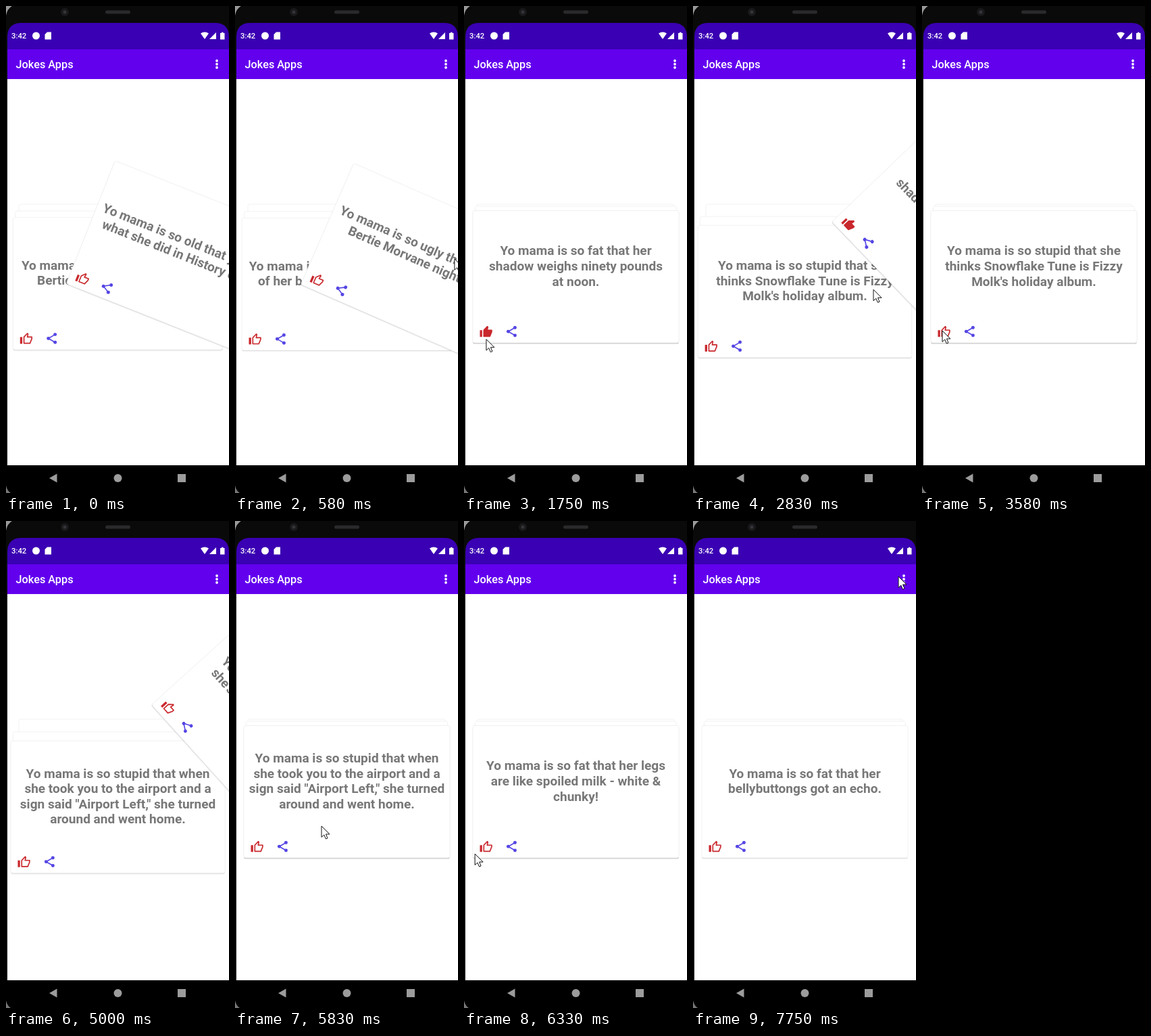
Animation, 330 px wide and 720 px high, one loop 8 s. Source, as an HTML page:

```html
<!DOCTYPE html>
<html lang="en">
<head>
<meta charset="utf-8">
<title>Joke cards</title>
<style>
html, body { margin: 0; width: 100%; height: 100%; overflow: hidden; background: #000; }
svg { display: block; width: 100vw; height: 100vh; }
text { font-family: Roboto, "Open Sans", sans-serif; }
.joke { font-size: 19.05px; font-weight: 700; fill: #777; text-anchor: middle; }
.face { fill: #fff; stroke: #efefef; stroke-width: .8; }
</style>
</head>
<body>
<svg viewBox="0 0 330 720">
  <defs>
    <clipPath id="page"><rect x="2" y="108" width="328" height="571"/></clipPath>
    <g id="share" fill="#5546e4" stroke="#5546e4" stroke-width="2">
      <path d="M18 5 6 12 18 19" fill="none"/>
      <g stroke="none"><circle cx="18" cy="5" r="3"/><circle cx="6" cy="12" r="3"/><circle cx="18" cy="19" r="3"/></g>
    </g>
    <g id="thumb" stroke="#c9282d" stroke-width="2" stroke-linejoin="round">
      <path d="M1 9H5V21H1Z" fill="#c9282d" stroke="none"/>
      <path d="M8 9 14.2 2.5 15.2 3.6 14 9H22V12L18.7 20H8Z"/>
    </g>
  </defs>
  <rect width="330" height="720" fill="#0a0a0a"/>
  <path d="M0 0H9Q2 4 0 14Z" fill="#999"/>
  <path d="M0 709Q2 717 7 720H0Z" fill="#777"/>
  <circle cx="87" cy="9" r="6" fill="#19191b"/>
  <circle cx="87" cy="9" r="2.5" fill="#343438"/>
  <rect x="147" y="6.500" width="37" height="5" rx="2.500" fill="#2a2a2c"/>
  <rect x="2" y="60" width="328" height="619" fill="#fff"/>
  <path d="M2 64V46Q2 25 23 25H309Q330 25 330 46V64Z" fill="#3a00b3"/>
  <rect x="2" y="64" width="328" height="44" fill="#6200ee"/>
  <g fill="#fff">
    <text x="8" y="48" font-size="11.300" font-weight="500">3:42</text>
    <circle cx="44.500" cy="44" r="5.500"/>
    <path d="M61 38.500H67V49.500H57.500V42Z"/>
    <path d="M288 40.500Q294 36.500 300 40.500L294 49Z"/>
    <path d="M311 39V49H301Z"/>
    <path d="M317 40H319V38.700H321.500V40H323.500V49.500H317Z"/>
    <text x="14.500" y="92.300" font-size="16.300" font-weight="500">Jokes Apps</text>
    <circle cx="312" cy="81" r="1.900"/><circle cx="312" cy="86" r="1.900"/><circle cx="312" cy="91" r="1.900"/>
  </g>
  <g clip-path="url(#page)">
    <rect class="face" x="19" y="293" width="292" height="195" rx="3"/>
    <rect class="face" id="third" height="195" rx="3"/>
    <g id="cards"></g>
  </g>
  <rect y="679" width="330" height="41" fill="#000"/>
  <path d="M0 709Q2 717 7 720H0Z" fill="#777"/>
  <g fill="#9c9c9c">
    <path d="M75.500 691.500V704.500L64 698Z"/>
    <circle cx="165.500" cy="698" r="6"/>
    <rect x="254" y="692" width="12" height="12"/>
  </g>
  <path id="cursor" d="M0 0V16.500L3.800 13 6.400 19 9 17.900 6.500 12H12Z" fill="#fff" stroke="#111" stroke-linejoin="round"/>
</svg>
<script>
const LOOP = 8000, CX = 165.5, CY = 400, LINE = 22.6;
const DRAG = 250, FLING = 180, REACH = 115, EXIT = 330, TILT = .213;

// grab: when the swipe starts; hold: where the pointer grabs; lift: slope of the swipe
const cards = [
  { text: "Yo mama is so old that you asked|what she did in History classes.",
    grab: -220, hold: [250, 420], lift: -.24 },
  { text: "Yo mama is so ugly that she gave|Bertie Morvane nightmares.",
    grab: 340, hold: [214, 391], lift: -.155 },
  { text: "Yo mama is so fat that the bottom|of her belly blocks out the sun.", grab: 340 },
  { text: "Yo mama is so fat that her|shadow weighs ninety pounds|at noon.",
    like: { t: 1540, x: 30, y: 494 }, grab: 2496, hold: [152, 440], lift: -.18 },
  { text: "Yo mama is so stupid that she|thinks Snowflake Tune is Fizzy|Molk's holiday album.",
    like: { t: 3620, x: 30, y: 480 }, grab: 4075, hold: [156, 439], lift: -.1 },
  { text: "Yo mama is so hairy that when|she's on holidays, bears wave.",
    grab: 4659, hold: [230, 420], lift: -.36 },
  { text: "Yo mama is so stupid that when|she took you to the airport and a|sign said \"Airport Left,\" she turned|around and went home.",
    grab: 5890, hold: [128, 451], lift: .37, side: -1 },
  { text: "Yo mama is so fat that her legs|are like spoiled milk - white &|chunky!",
    grab: 7000, hold: [220, 400], lift: -.12 },
  { text: "Yo mama is so fat that her|bellybuttongs got an echo.", grab: Infinity }
];

const $ = id => document.getElementById(id);
const mix = (a, b, p) => a + (b - a) * p;
const clamp = p => Math.min(1, Math.max(0, p));
const smooth = p => p * p * (3 - 2 * p);

function set(el, attrs) {
  for (const k in attrs) el.setAttribute(k, attrs[k]);
}

function make(tag, attrs, parent) {
  const el = document.createElementNS("http://www.w3.org/2000/svg", tag);
  set(el, attrs);
  parent.append(el);
  return el;
}

// steady drag, then a faster fling off the screen
function swipe({ grab, lift = 0, side = 1 }, t) {
  const age = Math.max(0, t - grab);
  const far = age < DRAG ? REACH * age / DRAG : mix(REACH, EXIT, (age - DRAG) / FLING);
  return [far * side, far * lift];
}

// the pointer visits every like button and follows every drag
function pointerStops() {
  const stops = [];
  for (const c of cards) {
    if (c.like) stops.push(c.like);
    if (!c.hold) continue;
    const [x, y] = c.hold, end = c.grab + DRAG, [dx, dy] = swipe(c, end);
    stops.push({ t: c.grab, x, y, drag: true }, { t: end, x: x + dx, y: y + dy });
  }
  return [...stops, { t: 7850, x: 304, y: 82 }];
}

const stops = pointerStops();

function pointer(t) {
  const next = stops.findIndex(s => s.t > t);
  if (next < 0) return stops[stops.length - 1];
  const a = stops[next - 1], b = stops[next], gap = b.t - a.t;
  const rest = Math.min(150, gap / 4);
  const p = a.drag ? (t - a.t) / gap : smooth(clamp((t - a.t - rest) / (gap - 2 * rest)));
  return { x: mix(a.x, b.x, p), y: mix(a.y, b.y, p) };
}

function build(card) {
  const g = card.el = make("g", {}, $("cards"));
  card.shades = [.05, .11].map((o, i) =>
    make("rect", { y: 304 - i, height: 196, rx: 3, "fill-opacity": o }, g));
  card.face = make("rect", { class: "face", y: 302.5, height: 195.5, rx: 3 }, g);
  const lines = card.text.split("|");
  lines.forEach((line, i) => {
    const y = 391 + (i - (lines.length - 1) / 2) * LINE;
    make("text", { class: "joke", x: CX, y }, g).textContent = line;
  });
  card.thumb = make("use", { href: "#thumb" }, g);
  card.share = make("use", { href: "#share" }, g);
}

// wide: how far each side grows while the card is second in the stack
function layout(card, t, wide, transform) {
  const box = { x: 13 - wide, width: 305 + 2 * wide };
  [...card.shades, card.face].forEach(el => set(el, box));
  set(card.thumb, {
    transform: `translate(${22.7 - wide} 471.8) scale(.83)`,
    fill: card.like && t >= card.like.t ? "#c9282d" : "none"
  });
  set(card.share, { transform: `translate(${60.5 - wide} 471.3) scale(.83)` });
  set(card.el, { transform });
}

function draw(t) {
  const top = cards.findIndex(c => t < c.grab + DRAG + FLING);
  const [dx, dy] = swipe(cards[top], t);
  const drop = Math.abs(dx) * .1;

  cards.forEach((c, i) => c.el.style.display = i === top || i === top + 1 ? "" : "none");
  layout(cards[top], t, 0, `translate(${dx} ${dy}) rotate(${dx * TILT} ${CX} ${CY})`);
  if (cards[top + 1]) layout(cards[top + 1], t, drop * .27, `translate(0 ${drop})`);

  const inset = 16.5 - drop * .28;
  set($("third"), { x: inset, y: 296 + drop * .7, width: 331 - 2 * inset });

  const { x, y } = pointer(t);
  set($("cursor"), { transform: `translate(${x} ${y})` });
}

cards.slice().reverse().forEach(build);

const start = performance.now();
function tick() {
  draw((performance.now() - start) % LOOP);
  requestAnimationFrame(tick);
}
tick();
</script>
</body>
</html>
```
